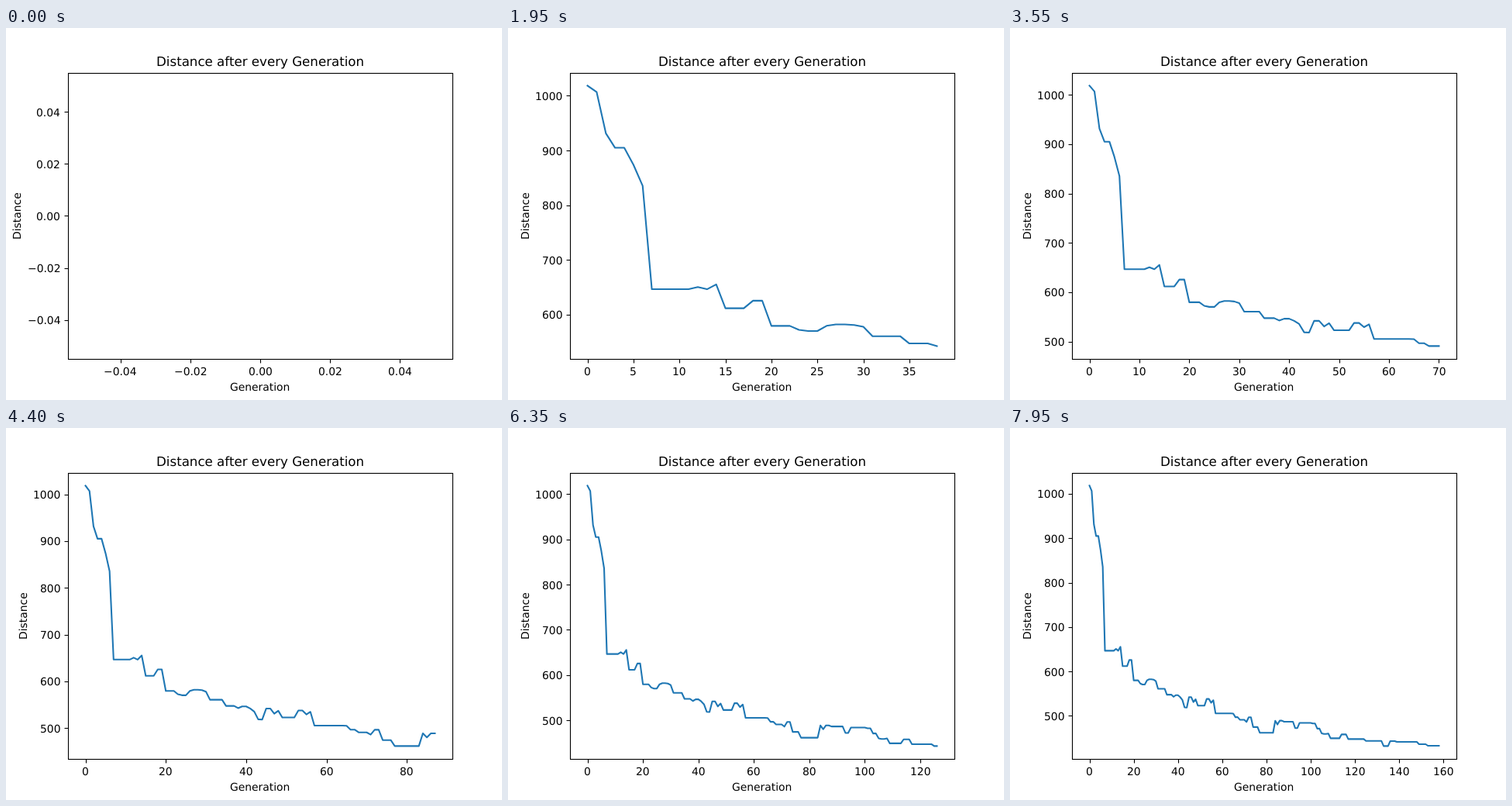
Write an HTML page with a canvas that moves like this. It is 640 px wide and 480 px high and loops after 8000 ms.

```html
<!DOCTYPE html>
<html lang="en">
<head>
<meta charset="utf-8">
<title>Distance after every Generation</title>
<style>
  html, body { margin: 0; width: 100%; height: 100%; overflow: hidden; background: #fff; }
  canvas { display: block; }
</style>
</head>
<body>
<canvas id="stage" width="640" height="480"></canvas>
<script>
const ctx = document.getElementById('stage').getContext('2d');
const STEP_MS = 50, STEPS = 160;
const BOX = { left: 80, right: 576, top: 57.6, bottom: 427.2 };
const MID_X = (BOX.left + BOX.right) / 2;
const MID_Y = (BOX.top + BOX.bottom) / 2;
const PT = 100 / 72;
const TICK_GAP = 7 * PT;

// Best distance per generation, as value or value x repeats.
const distances = `1018.5 1006.8 931.5 905x2 874 835.6 646.6x5 650.6 646.6 655.4
  611.8x3 625.6x2 579.7x3 572.5 570.3x2 579.7 582.2x2 581.3 578 560.8x4 547.5x3
  542.8 546.4x2 542 535.6 518.9 518.4 542x2 530.8 537.2 522.9x4 537.8x2 529.3
  534.9 505.4x8 505 496.8x2 491x3 486.2 496.6x2 474.5x3 461.7x7 488.8 480.3
  488.9x2 486.5x5 472.2x2 484x6 482.5x2 471x2 460.2 459x2 460 449.2x5 458x3
  447.4x8 443.2x8 431.7x3 443x3 441x10 435.9x4 432.4x6`
  .split(/\s+/)
  .flatMap(run => {
    const [value, count = 1] = run.split('x').map(Number);
    return Array(count).fill(value);
  });

// Data range with a 5% margin; a single value is widened first.
function limits(lo, hi) {
  if (lo === hi) {
    const grow = 0.05 * (Math.abs(lo) || 1);
    lo -= grow;
    hi += grow;
  }
  const margin = (hi - lo) * 0.05;
  return [lo - margin, hi + margin];
}

// Round tick values giving at most nine intervals.
function ticks([lo, hi]) {
  const raw = (hi - lo) / 9;
  const power = 10 ** Math.floor(Math.log10(raw));
  const step = power * [1, 2, 2.5, 5, 10].find(s => s * power >= raw - 1e-9);
  let digits = 0;
  while (Math.abs(step * 10 ** digits - Math.round(step * 10 ** digits)) > 1e-6) digits++;
  const list = [];
  for (let i = Math.ceil(lo / step); i * step <= hi; i++) {
    list.push({ value: i * step, label: (i * step).toFixed(digits).replace('-', '\u2212') });
  }
  return list;
}

function setFont(points) {
  ctx.font = `${points * PT}px "DejaVu Sans", sans-serif`;
}

// align: 0.5 centres on x, 1 ends at x.
function text(label, x, y, align) {
  const width = ctx.measureText(label).width;
  ctx.fillText(label, Math.round(x - width * align), Math.round(y));
}

function segment(x1, y1, x2, y2) {
  ctx.beginPath();
  ctx.moveTo(x1, y1);
  ctx.lineTo(x2, y2);
  ctx.stroke();
}

function drawCurve(data, toX, toY) {
  if (data.length < 2) return;
  ctx.strokeStyle = '#1f77b4';
  ctx.lineWidth = 1.5 * PT;
  ctx.lineCap = 'square';
  ctx.lineJoin = 'round';
  ctx.beginPath();
  data.forEach((value, i) => ctx.lineTo(toX(i), toY(value)));
  ctx.stroke();
}

function drawAxes(xTicks, yTicks, toX, toY) {
  ctx.strokeStyle = ctx.fillStyle = '#000';
  ctx.lineWidth = 0.8 * PT;
  ctx.lineCap = 'butt';
  ctx.lineJoin = 'miter';
  ctx.strokeRect(80.5, 58.5, 496, 369);
  setFont(10);
  for (const { value, label } of xTicks) {
    const x = toX(value), line = Math.round(x) + 0.5;
    segment(line, 427.5, line, 432.5);
    text(label, x, 448, 0.5);
  }
  for (const { value, label } of yTicks) {
    const y = toY(value), line = Math.round(y) + 0.5;
    segment(75.5, line, 80.5, line);
    text(label, BOX.left - TICK_GAP, y + 5.5, 1);
  }
}

function drawTitles(yLabelX) {
  text('Generation', MID_X, 468, 0.5);
  ctx.save();
  ctx.translate(yLabelX, Math.round(MID_Y) + 1);
  ctx.rotate(-Math.PI / 2);
  text('Distance', 0, 0, 0.5);
  ctx.restore();
  setFont(12);
  text('Distance after every Generation', MID_X, 49, 0.5);
}

function draw(count) {
  const data = distances.slice(0, count);
  const xLim = limits(0, Math.max(0, count - 1));
  const yLim = count ? limits(Math.min(...data), Math.max(...data)) : limits(0, 0);
  const toX = v => BOX.left + (v - xLim[0]) / (xLim[1] - xLim[0]) * (BOX.right - BOX.left);
  const toY = v => BOX.bottom - (v - yLim[0]) / (yLim[1] - yLim[0]) * (BOX.bottom - BOX.top);

  ctx.fillStyle = '#fff';
  ctx.fillRect(0, 0, 640, 480);
  drawCurve(data, toX, toY);
  drawAxes(ticks(xLim), ticks(yLim), toX, toY);
  drawTitles(count ? 27 : 19);
}

ctx.textRendering = 'geometricPrecision';
const start = performance.now();
let shown = -1;

function tick() {
  const step = Math.floor((performance.now() - start) / STEP_MS) % STEPS;
  if (step !== shown) draw(shown = step);
  requestAnimationFrame(tick);
}
tick();
</script>
</body>
</html>
```
